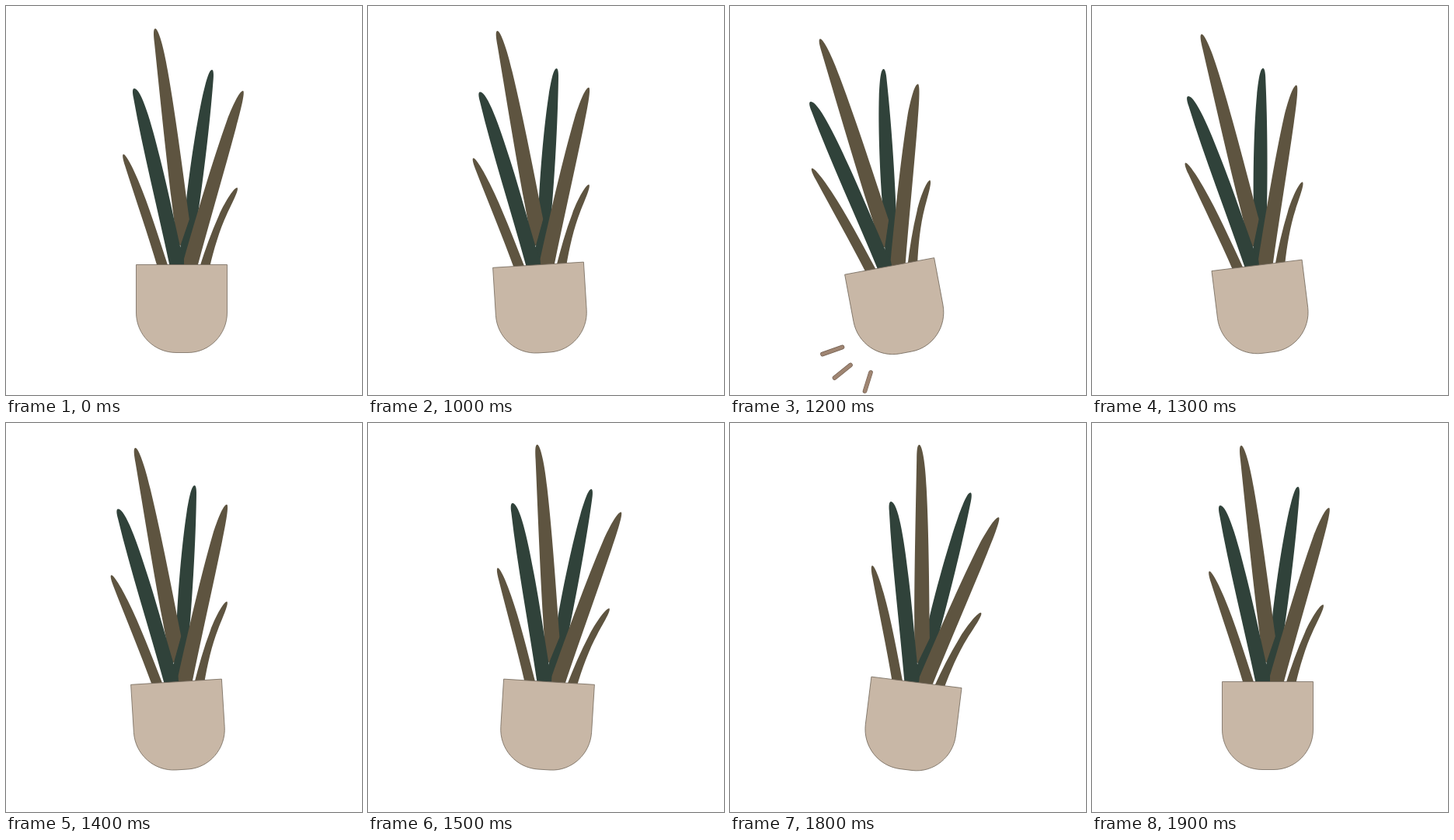
An HTML page for the animation above (2000 ms loop, 458x500 px).

```html
<!DOCTYPE html>
<html lang="en">
<head>
<meta charset="utf-8">
<title>Rocking plant</title>
<style>
  html, body { margin: 0; width: 100%; height: 100%; overflow: hidden; background: #fff; }
  svg { display: block; width: 458px; height: 500px; }
  .brown { fill: #5e5440; }
  .green { fill: #30423a; }
  .pot { fill: #c8b7a6; stroke: #74695c; stroke-width: .8; }
  .marks { visibility: hidden; stroke-linecap: round; }
  .edge { stroke: #705c4e; stroke-width: 5.6; }
  .core { stroke: #9f8572; stroke-width: 4.4; }
</style>
</head>
<body>
<svg viewBox="0 0 458 500">
  <defs>
    <path id="burst" d="M119 447.5 L144.5 438.5 M134.5 478 L155 461.5 M173.5 495 L181 471"/>
  </defs>
  <g id="plant">
    <path class="green" d="M265 82 C261 82 257 98 253 115 C245 152 237 205 232 250 L222 336 L236 336 L247 268 C254 220 262 155 266.500 97 C267.500 88 267 82 265 82Z"/>
    <path class="brown" d="M192 29 C189 29 190 39 191 48 C197 105 205 185 213 250 L220 306 L225 308 L236 275 C229 224 219 145 208 83 C203 53 196 29 192 29Z"/>
    <path class="green" d="M236 274 L225 306 L219 336 L234 336 L246 268Z"/>
    <path class="green" d="M165 106 C162 106 163 113 164 118 C176 186 195 260 211 336 L231 336 C222 304 211 246 198 195 C187 150 174 106 165 106Z"/>
    <path class="brown" d="M305 109 C300 109 291 130 285 145 C265 201 245 270 229 325 L229 336 L246 336 C261 280 281 212 296 156 C302 134 308 110 305 109Z"/>
    <path class="brown" d="M151 190.500 C149 191 151 199 153 205 C166 246 183 295 195 336 L209 336 C196 296 184 257 170 224 C163 207 154 190 151 190.500Z"/>
    <path class="brown" d="M297.500 233.500 C293 233 280 255 274 269 C264 291 256 314 249 336 L262 336 C267 314 275 287 284 268 C292 251 300 236 297.500 233.500Z"/>
    <path class="pot" d="M167.500 332.500 H284.500 V394 C284.500 422 262 445.500 234 445.500 H219 C190 445.500 167.500 422 167.500 394Z"/>
  </g>
  <g class="marks" id="leftMarks">
    <use href="#burst" class="edge"/><use href="#burst" class="core"/>
  </g>
  <g class="marks" id="rightMarks" transform="translate(525 575) rotate(180)">
    <use href="#burst" class="edge"/><use href="#burst" class="core"/>
  </g>
</svg>
<script>
  const LOOP = 2000, REST = 1000, STEP = 100;
  const TILT = 3.53; // degrees per step
  const poses = [-1, -2, -3, -2, -1, 1, 2, 3, 2, 0];
  const el = id => document.getElementById(id);
  const plant = el('plant'), left = el('leftMarks'), right = el('rightMarks');
  const show = (node, on) => { node.style.visibility = on ? 'visible' : 'hidden'; };

  function draw() {
    const t = performance.now() % LOOP;
    const pose = t < REST ? 0 : poses[Math.floor((t - REST) / STEP)];
    plant.setAttribute('transform', `rotate(${pose * TILT} 226 446)`);
    show(left, pose === -3);
    show(right, pose === 3);
    requestAnimationFrame(draw);
  }
  draw();
</script>
</body>
</html>
```
